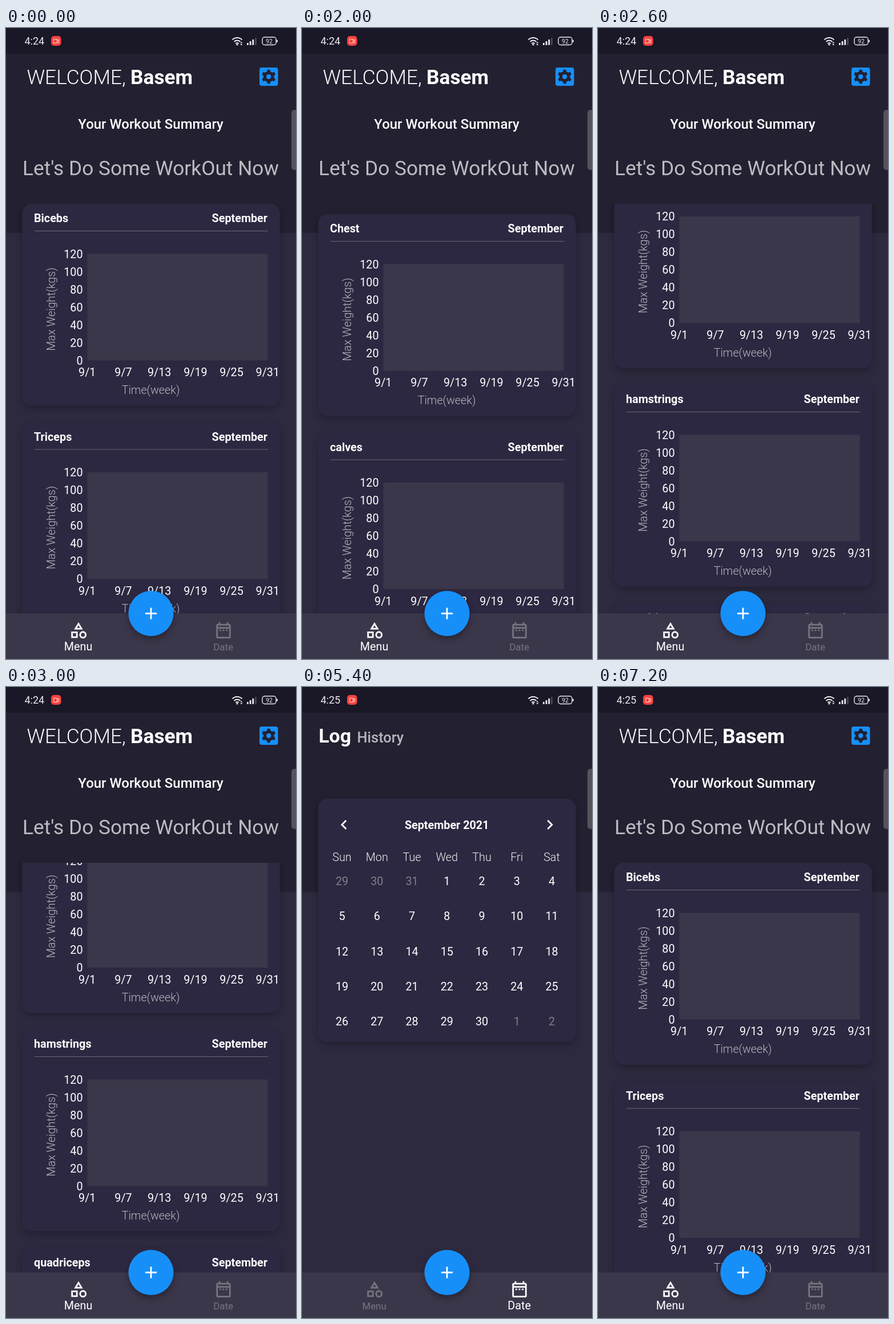
An HTML page that plays this animation: 508x1102 px, repeating every 8 s.

```html
<!DOCTYPE html>
<html lang="en">
<head>
<meta charset="utf-8">
<title>Workout summary</title>
<style>
  html, body { margin: 0; width: 100%; height: 100%; overflow: hidden; background: #2d2a3f; }
  svg { display: block; width: 508px; height: 1102px; }
  text { font-family: Roboto, sans-serif; fill: #fff; white-space: pre; }
  .tab { fill: #77747f; }
  .tab text { fill: #77747f; font-size: 16.93px; }
  .tab.on { fill: #fff; }
  .tab.on text { fill: #fff; font-size: 19.75px; }
</style>
</head>
<body>
<svg id="stage" viewBox="0 0 508 1102"></svg>
<script>
const LOOP = 8000, STEP = 200, PITCH = 381.5;
const MUSCLES = ['Bicebs', 'Triceps', 'Chest', 'calves', 'hamstrings', 'quadriceps'];
const SIZE = 19.75;

// y is the middle of the capitals
const text = (str, x, y, { size = SIZE, weight = 400, anchor = 'start', fill = '#fff', extra = '' } = {}) =>
  `<text x="${x}" y="${y + size * 0.3555}" font-size="${size}" font-weight="${weight}"
    text-anchor="${anchor}" style="fill:${fill}" ${extra}>${str}</text>`;

const rect = (x, y, w, h, fill, r = 0, extra = '') =>
  `<rect x="${x}" y="${y}" width="${w}" height="${h}" rx="${r}" fill="${fill}" ${extra}/>`;

const range = (n, fn) => Array.from({ length: n }, (_, i) => fn(i)).join('');

const panel = (y, h) =>
  rect(28.5, y + 5, 451, h, '#000', 16, 'opacity=".27" filter="url(#soft)"') +
  rect(28.5, y, 451, h, '#2d2841', 16);

function chartCard(name, i) {
  const label = { weight: 300, anchor: 'middle', fill: '#b9b7bf' };
  return `<g transform="translate(0 ${i * PITCH})">` + panel(307, 352.5) +
    text(name, 49, 332, { weight: 700 }) +
    text('September', 458, 332, { weight: 700, anchor: 'end' }) +
    rect(50, 354, 408.5, 1, '#6b6877') +
    rect(142.5, 394.5, 316, 186, '#3b374a') +
    range(7, k => text(120 - 20 * k, 134.5, 394.5 + 31.05 * k, { anchor: 'end' })) +
    range(6, k => text('9/' + (k ? Math.min(6 * k + 1, 31) : 1), 142.3 + 63.2 * k, 601, { anchor: 'middle' })) +
    text('Time(week)', 253.5, 632, label) +
    `<g transform="translate(78.5 491) rotate(-90)">${text('Max Weight(kgs)', 0, 0, label)}</g></g>`;
}

function gear() {
  return rect(444, 69, 32.5, 32, '#178ff9', 4) +
    '<g transform="translate(460.2 85)" fill="#232031"><circle r="9.4"/>' +
    range(3, k => `<path d="M-2.4-12.3h4.8l1.1 6v12.6l-1.1 6h-4.8l-1.1-6v-12.6z" transform="rotate(${60 * k})"/>`) +
    '<circle r="4.2" fill="#178ff9"/></g>';
}

function menuPage() {
  return text('WELCOME, ', 36.5, 85, { size: 35.28, weight: 300 }) +
    text('Basem', 218, 85, { size: 35.28, weight: 700 }) + gear() +
    text('Your Workout Summary', 253.5, 167, { size: 23.99, weight: 500, anchor: 'middle' }) +
    text("Let's Do Some WorkOut Now", 253.5, 244, { size: 35.28, anchor: 'middle', fill: '#bdbbc1' }) +
    `<g clip-path="url(#list)"><g id="cards">${MUSCLES.map(chartCard).join('')}</g></g>`;
}

function logPage() {
  const col = i => 70 + 61.25 * i;
  return text('Log', 29.2, 84.8, { size: 33.87, weight: 700 }) +
    text('History', 96.5, 87.5, { size: 25.4, weight: 500, fill: '#b8b6bd' }) + panel(195, 425) +
    text('September 2021', 253.7, 240.5, { weight: 700, anchor: 'middle' }) +
    '<path d="M77.3 233l-7.4 7.5 7.4 7.5M430.4 233l7.4 7.5-7.4 7.5" fill="none" stroke="#fff" stroke-width="2.8"/>' +
    ['Sun', 'Mon', 'Tue', 'Wed', 'Thu', 'Fri', 'Sat']
      .map((d, i) => text(d, col(i), 297, { weight: 300, anchor: 'middle', fill: '#eeedf0' })).join('') +
    range(35, i => {
      const day = i < 3 ? 29 + i : i > 32 ? i - 32 : i - 2;
      const fill = i < 3 || i > 32 ? '#817e89' : '#fff';
      return text(day, col(i % 7), 339 + 61.3 * Math.floor(i / 7), { anchor: 'middle', fill });
    });
}

function statusBar() {
  return rect(0, 0, 508, 45, '#1a1726') +
    text('4:24', 32.5, 23, { size: 18, fill: '#eceaee', extra: 'id="clock"' }) +
    rect(79, 14, 17.5, 17, '#f8433f', 5) +
    '<path d="M83.5 19.5h6v7h-6zM90 22l2.5-2v6l-2.5-2" fill="none" stroke="#ffd9d6"/>' +
    '<g fill="none" stroke="#eceaee" stroke-width="2">' +
    '<path d="M396.5 20.5a12 12 0 0 1 17 0M399.5 24a8 8 0 0 1 11 0M402.3 27.2a4 4 0 0 1 5.4 0"/>' +
    '<rect x="449" y="16" width="24" height="13.5" rx="4" stroke-width="1.4"/></g>' +
    '<g fill="#eceaee"><circle cx="405" cy="29" r="1.6"/><path d="M410.3 26.5l2-2.5 2 2.5zM410.3 28l2 2.5 2-2.5z"/>' +
    range(4, k => rect(422 + 4.7 * k, 26 - 3 * k, 2.8, 4 + 3 * k, k > 2 ? '#4b4855' : '#eceaee', 1)) +
    rect(474, 20.5, 1.8, 4.5, '#eceaee', 0.8) + '</g>' +
    text('92', 461, 22.8, { size: 10.5, anchor: 'middle', fill: '#eceaee' });
}

function tab(id, label, x, path) {
  return `<g id="${id}" class="tab"><path fill-rule="evenodd" transform="translate(${x - 16.93} 1035) scale(1.411)" d="${path}"/>
    <text x="${x - 0.4}" y="1086.7" text-anchor="middle">${label}</text></g>`;
}

const navBar = () => rect(0, 1022.5, 508, 80, '#3b374b') +
  tab('menuTab', 'Menu', 127, 'M12 2l-5.5 9h11zM12 5.84L13.93 9h-3.87zM3 13.5h8v8H3zM5 15.5h4v4H5z' +
    'M13 17.5a4.5 4.5 0 1 0 9 0a4.5 4.5 0 1 0-9 0zM15 17.5a2.5 2.5 0 1 0 5 0a2.5 2.5 0 1 0-5 0z') +
  tab('dateTab', 'Date', 381, 'M5 4h1V2h2v2h8V2h2v2h1a2 2 0 0 1 2 2v14a2 2 0 0 1-2 2H5a2 2 0 0 1-2-2V6a2 2 0 0 1 2-2z' +
    'M5 6h14v2H5zM5 10h14v10H5zM7 11h2v2H7zM11 11h2v2h-2zM15 11h2v2h-2z') +
  '<circle cx="254" cy="1028" r="38" opacity=".4" filter="url(#soft)"/>' +
  '<circle cx="254" cy="1022.5" r="39.5" fill="#178ff9"/>' +
  '<path d="M244.1 1022.5h19.8M254 1012.6v19.8" stroke="#fff" stroke-width="2.8"/>';

const $ = id => document.getElementById(id);

$('stage').innerHTML =
  `<defs><filter id="soft" x="-20%" y="-20%" width="140%" height="140%"><feGaussianBlur stdDeviation="7"/></filter>
  <clipPath id="list"><rect y="307" width="508" height="716"/></clipPath></defs>` +
  rect(0, 0, 508, 1102, '#2d2a3f') + rect(0, 45, 508, 313, '#232031') +
  `<g id="menu">${menuPage()}</g><g id="log">${logPage()}</g>` +
  navBar() + statusBar() + rect(500, 143, 16, 105, '#55525c', 5);

// Scroll offsets, one per step from 1600 ms on: a flick, a touch, then a fling that settles
const SCROLL = [581, 592, 745, 959.5, 1125, 1210, 1229, 1235, 1236.5];

function scrollAt(t) {
  if (t < 1600 || t >= 5000) return 0;
  return SCROLL[Math.min(Math.floor((t - 1600) / STEP), SCROLL.length - 1)];
}

function draw(now) {
  const t = now % LOOP;
  const onLog = t >= 5000 && t < 6800;
  const dateActive = t >= 5000 && t < 7000;
  $('menu').style.display = onLog ? 'none' : '';
  $('log').style.display = onLog ? '' : 'none';
  $('menuTab').classList.toggle('on', !dateActive);
  $('dateTab').classList.toggle('on', dateActive);
  $('cards').setAttribute('transform', `translate(0 ${-scrollAt(t)})`);
  $('clock').textContent = t < 3800 ? '4:24' : '4:25';
}

const start = performance.now();
function tick() {
  draw(performance.now() - start);
  requestAnimationFrame(tick);
}
tick();
</script>
</body>
</html>
```
